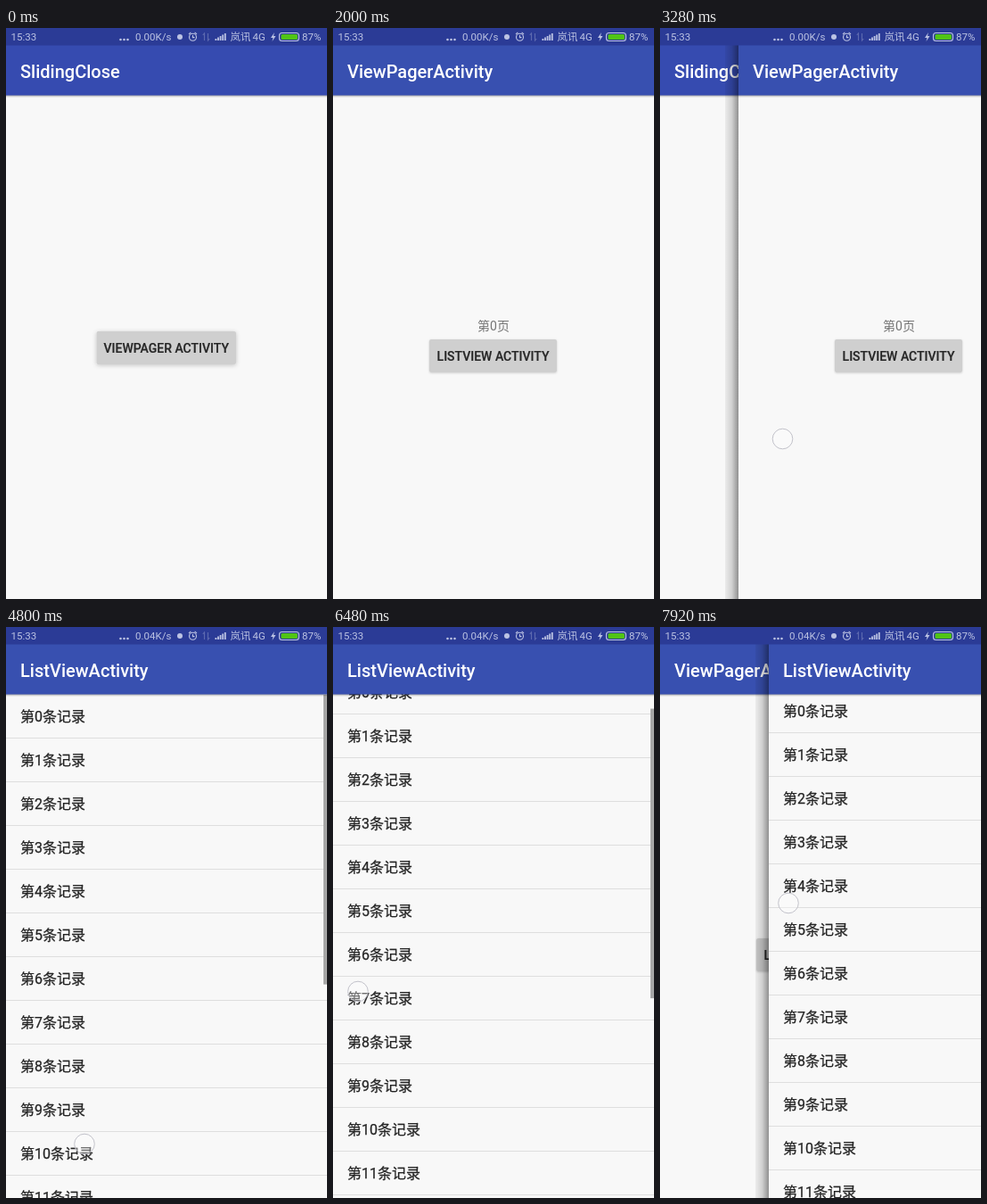
These frames come from a looping animation (360x640 px, 8 s). An HTML page:

```html
<!DOCTYPE html>
<html lang="zh-CN">
<head>
<meta charset="utf-8">
<title>SlidingClose</title>
<style>
html, body { margin: 0; width: 100%; height: 100%; overflow: hidden; background: #f8f8f8; }
svg { display: block; width: 360px; height: 640px; }
text { font-family: Roboto, "Noto Sans CJK SC", "Noto Sans CJK", sans-serif; }
.title { font-size: 20px; font-weight: 500; fill: #fff; }
.label { font-size: 14px; font-weight: 500; fill: #262626; stroke: #262626; stroke-width: .2px; text-anchor: middle; }
.page { font-size: 14px; fill: #757575; text-anchor: middle; }
.row { font-size: 16px; fill: #242424; stroke: #242424; stroke-width: .25px; }
.status { font-size: 11.5px; fill: #bcc3e3; }
</style>
</head>
<body>
<svg viewBox="0 0 360 640">
  <defs>
    <linearGradient id="edge">
      <stop offset="0" stop-opacity=".05"/>
      <stop offset=".5" stop-opacity=".16"/>
      <stop offset="1" stop-opacity=".42"/>
    </linearGradient>
    <linearGradient id="drop" x2="0" y2="1">
      <stop offset="0" stop-opacity=".34"/>
      <stop offset="1" stop-opacity="0"/>
    </linearGradient>
    <filter id="lift" x="-10%" y="-30%" width="120%" height="170%">
      <feDropShadow dx="0" dy=".7" stdDeviation=".8" flood-opacity=".18"/>
    </filter>
    <filter id="raised" x="-10%" y="-30%" width="120%" height="170%">
      <feDropShadow dx="0" dy="1" stdDeviation="2.6" flood-opacity=".22"/>
    </filter>
  </defs>
  <g id="main"></g>
  <g id="pager"></g>
  <g id="list"></g>
  <g id="status"></g>
  <circle id="finger" r="11.3" fill="#fff" fill-opacity=".35" stroke="#c2c2ca"/>
</svg>
<script>
const LOOP = 8000, STEP = 80, ROW = 49, ROWS = 20, TOP = 76, VIEW = 564;
const $ = id => document.getElementById(id);
const move = (el, x, y = 0) => el.setAttribute('transform', `translate(${x} ${y})`);
const fade = (el, a) => {
  el.setAttribute('opacity', a);
  el.style.display = a > 0 ? '' : 'none';
};

const rect = (x, y, w, h, fill, more = '') =>
  `<rect x="${x}" y="${y}" width="${w}" height="${h}" fill="${fill}" ${more}/>`;
const text = (x, y, cls, s) => `<text x="${x}" y="${y}" class="${cls}">${s}</text>`;
const appBar = (title, fill = '#3850b0') =>
  rect(0, 75, 360, 3, 'url(#drop)') + rect(0, 19, 360, 56.5, fill) + text(16, 55.5, 'title', title);
const button = (id, x, y, w, h, label) =>
  rect(x, y, w, h, '#cfcfcf', `id="${id}" rx="2" filter="url(#lift)"`) +
  text(x + w / 2, y + h / 2 + 5, 'label', label);
const edge = rect(-15, 19, 15, 621, 'url(#edge)');
const pageBody = (n, id) =>
  text(180, 339, 'page', `第${n}页`) + button(id, 108, 349, 143, 37, 'LISTVIEW ACTIVITY');

$('main').innerHTML = rect(0, 0, 360, 640, '#f8f8f8') +
  button('openPager', 101.5, 340, 156.5, 37, 'VIEWPAGER ACTIVITY') +
  appBar('SlidingClose', '#364bb0');

$('pager').innerHTML = edge +
  `<svg width="360" height="640">${rect(0, 19, 360, 621, '#f8f8f8')}
  <g id="pages">${pageBody(0, 'openList')}
  <g transform="translate(360 0)">${rect(0, 19, 360, 621, '#7b79f8') + pageBody(1, 'openNext')}</g></g>
  ${appBar('ViewPagerActivity')}</svg>`;

let rows = '';
for (let i = 0; i < ROWS; i++) {
  const y = TOP + i * ROW;
  rows += text(16, y + 30, 'row', `第${i}条记录`) + rect(0, y + 48, 360, 1, '#dedede');
}
$('list').innerHTML = edge +
  `<svg width="360" height="640">${rect(0, 19, 360, 621, '#f8f8f8')}
  <g id="rows">${rows}</g>
  ${rect(356, TOP, 4, VIEW * VIEW / (ROW * ROWS), '#a6a6a6', 'id="bar"')}
  ${appBar('ListViewActivity')}</svg>`;

let icons = '';
for (let i = 0; i < 3; i++) icons += `<circle cx="${128.5 + i * 4}" cy="13" r="1.3"/>`;
for (let i = 0; i < 5; i++) icons += rect(234.5 + i * 2.6, 12 - i * 1.5, 1.8, 2 + i * 1.5, '#bcc3e3');
$('status').innerHTML = rect(0, 0, 360, 19.5, '#2b3b96') +
  text(5.5, 14, 'status', '15:33') +
  `<text x="145" y="14" class="status" id="speed"></text>` +
  text(251.5, 14, 'status', '岚讯') + text(276.5, 14, 'status', '4G') + text(332, 14, 'status', '87%') +
  `<g fill="#bcc3e3">${icons}<circle cx="195" cy="10" r="3"/><path d="M301 5l-4 6h2.5l-1 4 4-6H300z"/></g>
  <g fill="none" stroke="#bcc3e3" stroke-width="1.1">
    <circle cx="209.5" cy="10.3" r="4"/><path d="M209.5 8v2.6h2M205 7l2.4-2.2M214 7l-2.4-2.2"/>
    <rect x="306.5" y="5.5" width="22" height="9" rx="3"/>
    <path id="arrows" d="M222.5 14V6l-1.8 2M226.5 6v8l1.8-2"/>
  </g>` + rect(308.5, 7, 18.5, 6, '#50c415', 'rx="1.5"');

// Eased value along [time, value] points.
function track(points, t) {
  if (t <= points[0][0]) return points[0][1];
  for (let i = 1; i < points.length; i++) {
    const [t0, a] = points[i - 1], [t1, b] = points[i];
    if (t <= t1) {
      const k = (t - t0) / (t1 - t0);
      return a + (b - a) * k * k * (3 - 2 * k);
    }
  }
  return points[points.length - 1][1];
}

const swipe = [[1200, -50], [1480, -150], [1800, -45], [2000, 0]];
const pagerSlide = [[2160, 0], [2720, 170], [3280, 88], [3600, 40], [3840, 0]];
const listSlide = [[6900, 0], [7440, 150], [7920, 122]];
const scrolling = [[4800, 0], [5200, 210], [5440, 260], [5600, 260], [6240, 60], [6480, 27], [6880, 6]];

function touch(t, page, pagerX, listX, scroll) {
  const during = (a, b) => t >= a && t < b;
  if (during(80, 240)) return [180, 360];
  if (during(1200, 1800)) return [204.5 + page, 481];
  if (during(2160, 3680)) return [49.5 + pagerX, 460.5];
  if (during(3920, 4080)) return [180, 368];
  if (during(4640, 5280)) return [88, 579.5 - scroll];
  if (t >= 5600) {
    return [track([[6480, 28], [6900, 22]], t) + listX,
      435.5 - scroll - track([[6900, 0], [7920, 120]], t)];
  }
  return null;
}

function draw(t) {
  const page = t < 1200 ? 0 : track(swipe, t);
  const pagerX = track(pagerSlide, t), listX = track(listSlide, t), scroll = track(scrolling, t);

  fade($('pager'), track([[320, 0], [640, 1]], t));
  fade($('list'), track([[4000, 0], [4320, 1]], t));
  move($('pager'), pagerX);
  move($('pages'), page);
  move($('list'), listX);
  move($('rows'), 0, -scroll);
  move($('bar'), 0, scroll * VIEW / (ROW * ROWS));
  fade($('bar'), t < 4640 ? track([[4080, 0], [4320, 1]], t) : track([[7120, 1], [7360, 0]], t));

  $('openPager').setAttribute('filter', t < 320 ? 'url(#raised)' : 'url(#lift)');
  $('openPager').setAttribute('fill', t >= 80 && t < 400 ? '#c4c4c4' : '#cfcfcf');
  $('openList').setAttribute('fill', t >= 3920 && t < 4320 ? '#c4c4c4' : '#cfcfcf');
  $('speed').textContent = t < 4160 ? '0.00K/s' : '0.04K/s';
  $('arrows').setAttribute('opacity', t >= 4160 && t < 4480 ? .9 : .35);

  const at = touch(t, page, pagerX, listX, scroll);
  fade($('finger'), at ? 1 : 0);
  if (at) move($('finger'), at[0], at[1]);
}

const start = performance.now();
function tick() {
  const t = (performance.now() - start) % LOOP;
  draw(Math.floor(t / STEP) * STEP);
  requestAnimationFrame(tick);
}
tick();
</script>
</body>
</html>
```
